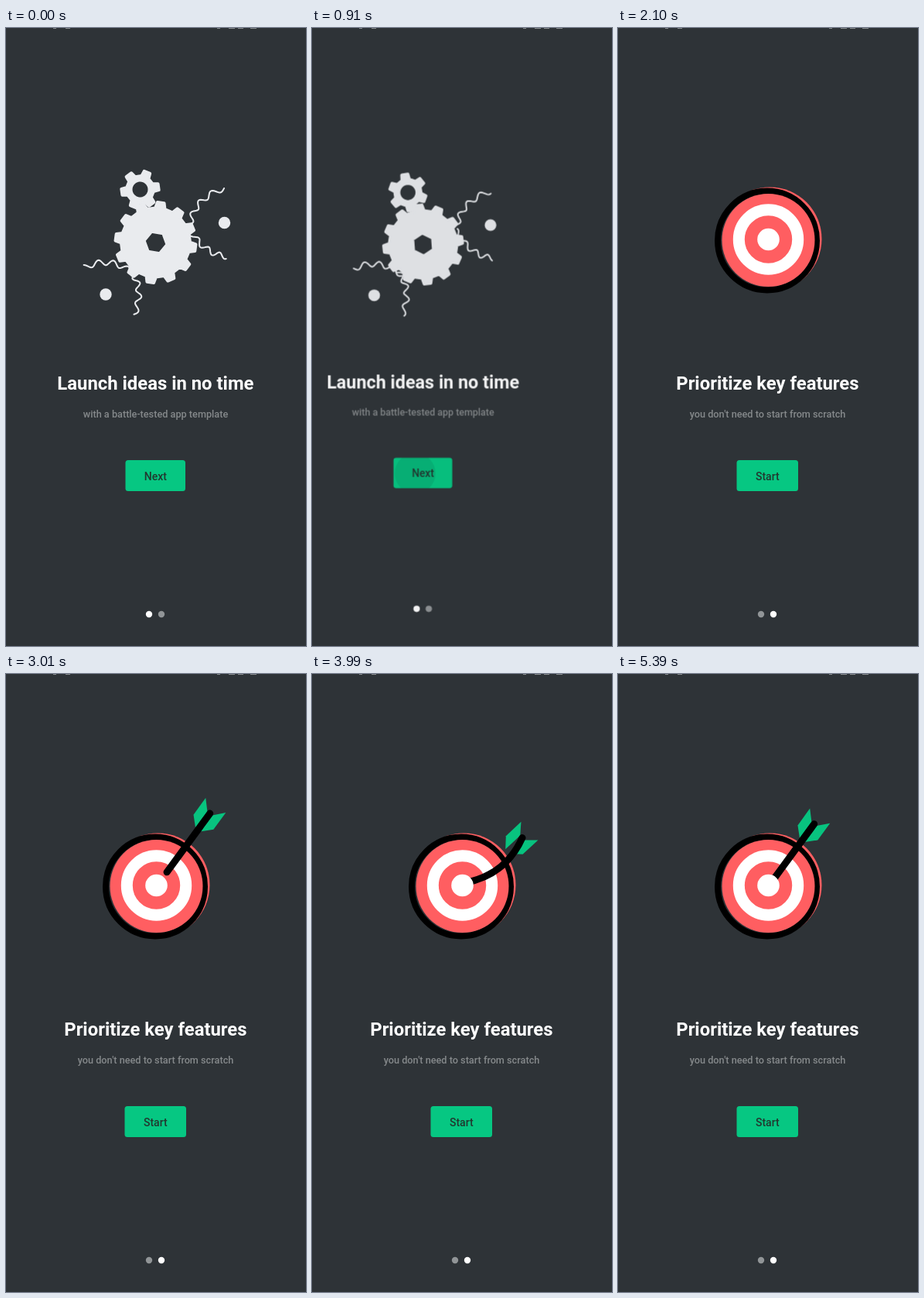
Recreate the animation shown at these times as an HTML page. Size 388 px wide and 798 px high, loop 5460 ms.

```html
<!DOCTYPE html>
<html lang="en">
<head>
<meta charset="utf-8">
<title>Onboarding</title>
<style>
  html, body { margin: 0; width: 100%; height: 100%; overflow: hidden; background: #2e3337; }
  svg { display: block; width: 388px; height: 798px; font-family: Roboto, sans-serif; text-anchor: middle; }
  .title { font-size: 23.85px; font-weight: 700; fill: #fff; }
  .sub { font-size: 12.7px; font-weight: 500; fill: #85898b; }
  .btn { fill: #06c782; }
  .label { font-size: 14px; font-weight: 500; fill: #22372f; }
  .on { fill: #fff; }
  .off { fill: #919597; }
  .gear { fill: #e9ebee; stroke: #e9ebee; stroke-width: 4; stroke-linejoin: round; fill-rule: evenodd; }
  .wave { fill: none; stroke: #e9ebee; stroke-width: 2; stroke-linecap: round; stroke-linejoin: round; }
  .dot { fill: #e9ebee; }
  .coral { fill: #ff5e61; }
  .feather { fill: #08c37f; }
</style>
</head>
<body>
<svg viewBox="0 0 388 798">
  <defs>
    <clipPath id="art"><rect x="68" y="152" width="250" height="250"/></clipPath>
    <clipPath id="btnClip"><rect x="154.5" y="558" width="77.5" height="40" rx="3.5"/></clipPath>
  </defs>
  <rect width="388" height="798" fill="#2e3337"/>

  <g id="first">
    <g id="waves"></g>
    <path id="small" class="gear"/>
    <path id="big" class="gear"/>
    <circle class="dot" cx="282.5" cy="251.5" r="7.7"/>
    <circle class="dot" cx="129" cy="344" r="7.7"/>
    <text class="title" x="193.4" y="467">Launch ideas in no time</text>
    <text class="sub" x="193.5" y="502.5">with a battle-tested app template</text>
    <rect class="btn" x="154.5" y="558" width="77.5" height="40" rx="3.5"/>
    <g clip-path="url(#btnClip)"><circle id="ripple" cx="183" cy="578.5" r="0"/></g>
    <text class="label" x="193.3" y="583.5">Next</text>
    <circle class="on" cx="185" cy="757" r="4.2"/>
    <circle class="off" cx="201" cy="757" r="4.2"/>
  </g>

  <g id="second">
    <circle class="coral" cx="196.5" cy="272.5" r="67"/>
    <circle cx="193" cy="274.5" r="64" fill="#2e3337" stroke="#000" stroke-width="8"/>
    <circle class="coral" cx="194.5" cy="274" r="60"/>
    <circle cx="194.5" cy="273" r="38.2" fill="none" stroke="#fff" stroke-width="15"/>
    <g clip-path="url(#art)">
      <g id="arrow">
        <g id="feathers">
          <path class="feather" d="M94 -4L107 -16.3L80 -16L68 -4Z"/>
          <path class="feather" d="M94 4L107 16L80 16L68 4Z"/>
        </g>
        <path id="shaft" fill="none" stroke="#000" stroke-width="9" stroke-linecap="round"/>
      </g>
    </g>
    <circle cx="194.5" cy="273" r="14.3" fill="#fff"/>
    <text class="title" x="193.4" y="467">Prioritize key features</text>
    <text class="sub" x="193.5" y="502.5">you don't need to start from scratch</text>
    <rect class="btn" x="153.5" y="558" width="79.5" height="40" rx="3.5"/>
    <text class="label" x="193.3" y="583.5">Start</text>
    <circle class="off" cx="185" cy="757" r="4.2"/>
    <circle class="on" cx="201" cy="757" r="4.2"/>
  </g>

  <!-- cut-off status bar -->
  <path d="M61 0h4M77 0h6M273 0h4M288 0h8M300 0h7M316 0h8" stroke="#a5a8aa" stroke-width="1.6"/>
</svg>
<script>
const LOOP = 5460, STEP = 70, WIDTH = 388;
const SLIDE = { start: 768, length: 560 };
const HIT = 3030, SPEED = 0.85;
const SWING = { start: 3080, peak: 3990, end: 5250, period: 680, angle: 15.6, bow: 16, lead: 0.7 };
const SPIN = -0.1143; // big gear, degrees per ms
const RAD = Math.PI / 180;

const el = id => document.getElementById(id);
const clamp = x => Math.min(1, Math.max(0, x));
const easeInOut = x => x < .5 ? 2 * x * x : 1 - 2 * (1 - x) ** 2;
const polar = (r, deg) => (r * Math.cos(deg * RAD)).toFixed(2) + ' ' + (r * Math.sin(deg * RAD)).toFixed(2);
const ring = (n, r, turn) => 'M' + Array.from({ length: n }, (_, i) => polar(r, turn + i * 360 / n)).join('L') + 'Z';

function gear(teeth, outer, root, hole) {
  const pitch = 360 / teeth, points = [];
  for (let i = 0; i < teeth; i++) {
    const a = i * pitch;
    points.push(polar(root, a - pitch * .27), polar(outer, a - pitch * .16),
                polar(outer, a + pitch * .16), polar(root, a + pitch * .27));
  }
  return 'M' + points.join('L') + 'Z' + hole;
}

el('big').setAttribute('d', gear(12, 52, 44.5, ring(6, 15.2, 2.5)));
el('small').setAttribute('d', gear(6, 24.2, 17.5, ring(36, 12, 0)));

// Each squiggle follows a quadratic curve: start, control, end.
const curves = [
  [238, 254, 243, 220, 282, 207],
  [236, 258, 256, 292, 285, 295],
  [166, 318, 136, 293, 102, 309],
  [160, 312, 180, 336, 166, 370]
];
const waves = curves.map(() => {
  const path = document.createElementNS('http://www.w3.org/2000/svg', 'path');
  path.setAttribute('class', 'wave');
  el('waves').append(path);
  return path;
});

function squiggle([x0, y0, x1, y1, x2, y2], phase) {
  const points = [];
  for (let i = 0; i <= 48; i++) {
    const s = i / 48, q = 1 - s;
    const x = q * q * x0 + 2 * q * s * x1 + s * s * x2;
    const y = q * q * y0 + 2 * q * s * y1 + s * s * y2;
    const dx = q * (x1 - x0) + s * (x2 - x1), dy = q * (y1 - y0) + s * (y2 - y1);
    const k = 3.6 * Math.sin(s * 7 * Math.PI - phase) / Math.hypot(dx, dy);
    points.push((x - dy * k).toFixed(1) + ' ' + (y + dx * k).toFixed(1));
  }
  return 'M' + points.join('L');
}

function place(page, p) {
  const away = Math.abs(p), shown = away < 1;
  page.style.display = shown ? '' : 'none';
  if (!shown) return;
  page.setAttribute('transform', `translate(${193 + p * WIDTH} 399) scale(${1 - .155 * away}) translate(-193 -399)`);
  page.setAttribute('opacity', 1 - .4 * away);
}

function drawGears(t) {
  el('big').setAttribute('transform', `translate(193.5 277) rotate(${7.5 + t * SPIN})`);
  el('small').setAttribute('transform', `translate(173.5 208.5) rotate(${52 - 2 * t * SPIN})`);
  waves.forEach((path, i) => path.setAttribute('d', squiggle(curves[i], t * .008 + i)));
  el('ripple').setAttribute('r', Math.max(0, (t - 700) * .128));
  el('ripple').setAttribute('opacity', .08 * clamp((1250 - t) / 250));
}

function drawArrow(t) {
  const back = Math.max(0, HIT - t) * SPEED;
  const { start, peak, end, period, angle, bow, lead } = SWING;
  const size = t < peak ? Math.sqrt(clamp((t - start) / (peak - start))) : clamp((end - t) / (end - peak));
  const phase = (t - peak) / period * 2 * Math.PI;
  const turn = size * angle * Math.cos(phase);
  const bend = 2 * size * bow * Math.cos(phase + lead);
  el('arrow').setAttribute('transform', `translate(198 269.5) rotate(${-53.7 + turn}) translate(${back} 0)`);
  el('feathers').setAttribute('transform', `rotate(${-.3 * turn} 94 0)`);
  el('shaft').setAttribute('d', `M0 0Q47 ${bend} 94 0`);
}

const origin = performance.now();
function frame() {
  const t = Math.floor((performance.now() - origin) % LOOP / STEP) * STEP;
  const p = easeInOut(clamp((t - SLIDE.start) / SLIDE.length));
  place(el('first'), -p);
  place(el('second'), 1 - p);
  drawGears(t);
  drawArrow(t);
  requestAnimationFrame(frame);
}
frame();
</script>
</body>
</html>
```
